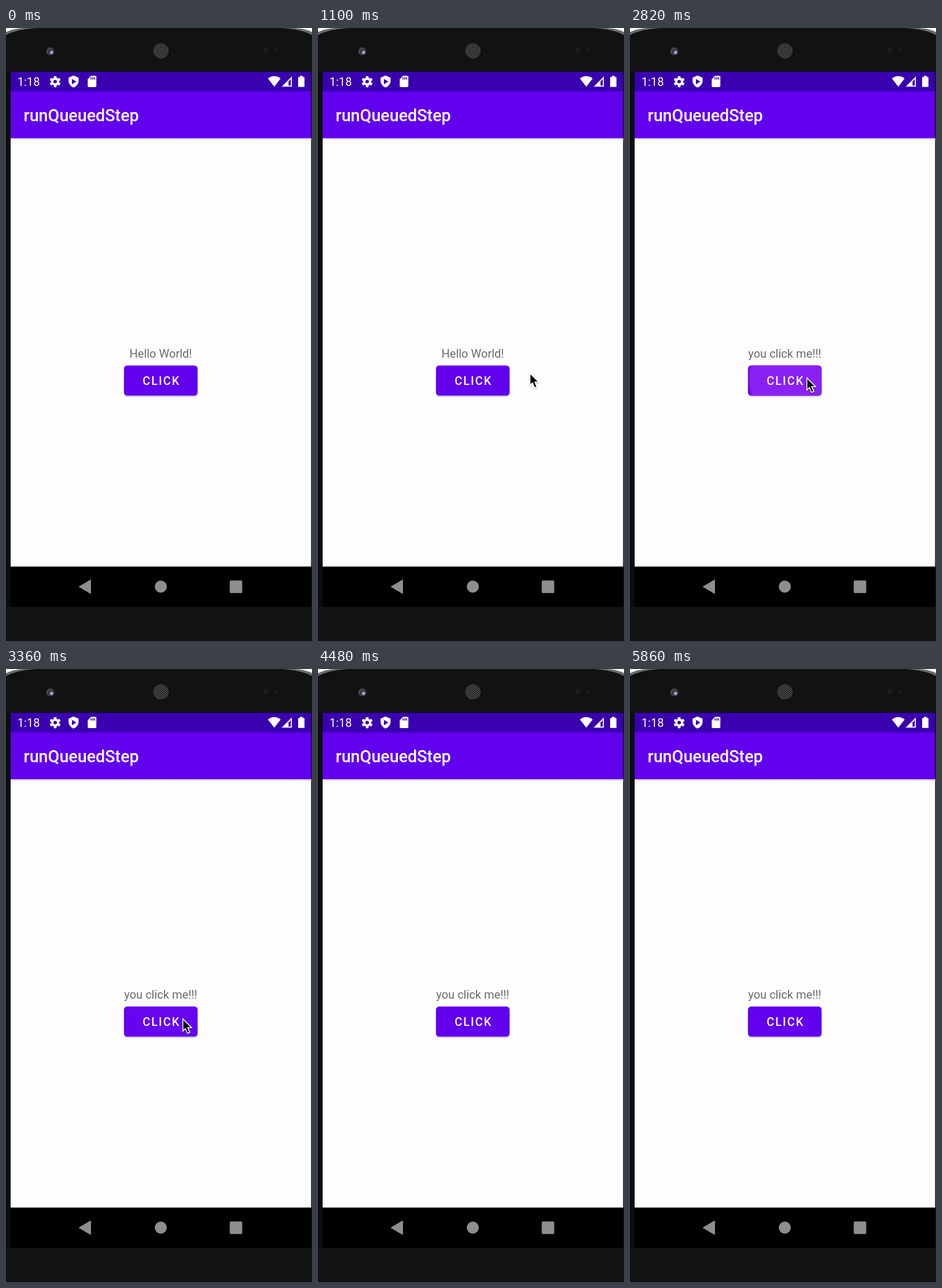
Recreate the animation shown at these times as an HTML page. Size 529 by 1058 pixels, loop 5960 ms.

```html
<!DOCTYPE html>
<html lang="en">
<head>
<meta charset="utf-8">
<title>Button demo</title>
<style>
  html, body { margin: 0; width: 100%; height: 100%; overflow: hidden; background: #fff; }
  svg { display: block; width: 529px; height: 1058px; }
  text { font-family: Roboto, "Noto Sans", sans-serif; }
  .label { font-size: 20.05px; fill: #6b6b6b; text-anchor: middle; }
  .medium { font-weight: 500; fill: #fff; }
  #ripple { transform-box: fill-box; transform-origin: center; }
</style>
</head>
<body>
<svg viewBox="0 0 529 1058" xmlns="http://www.w3.org/2000/svg">
  <defs>
    <pattern id="mesh" width="4" height="4" patternUnits="userSpaceOnUse">
      <rect width="4" height="4" fill="#222"/>
      <circle cx="1" cy="1" r="1" fill="#5a5a5a"/>
      <circle cx="3" cy="3" r="1" fill="#5a5a5a"/>
    </pattern>
    <radialGradient id="lens" cx=".64" cy=".62">
      <stop offset="0" stop-color="#e4e4f6"/>
      <stop offset=".3" stop-color="#8883ac"/>
      <stop offset=".65" stop-color="#2c2b38"/>
      <stop offset="1" stop-color="#484848"/>
    </radialGradient>
    <radialGradient id="glow">
      <stop offset=".94" stop-color="#8a20f2"/>
      <stop offset="1" stop-color="#8a20f2" stop-opacity="0"/>
    </radialGradient>
    <linearGradient id="edge" x2="0" y2="1">
      <stop offset="0" stop-color="#d2d0d8"/>
      <stop offset="1" stop-color="#fdfdfd"/>
    </linearGradient>
    <filter id="soft" x="-10%" y="-20%" width="120%" height="150%">
      <feDropShadow dx="0" dy="1.8" stdDeviation="1.3" flood-opacity=".22"/>
    </filter>
    <filter id="drop" x="-30%" y="-20%" width="170%" height="150%">
      <feDropShadow dx="0" dy="1.5" stdDeviation="1.2" flood-opacity=".3"/>
    </filter>
    <clipPath id="face"><rect x="204" y="582.5" width="127.2" height="52" rx="5.5"/></clipPath>
  </defs>

  <!-- phone body -->
  <path d="M0 7Q13 1 30 0H500Q517 1 529 7V1058H0Z" fill="#6a6a6a"/>
  <path d="M0 12Q20 2 52 0H476Q510 2 529 12V1058H0Z" fill="#121212"/>
  <rect y="76" width="8" height="922" fill="#0c0c0c"/>
  <circle cx="76.8" cy="40.4" r="7" fill="url(#lens)"/>
  <circle cx="268" cy="39.5" r="13.2" fill="url(#mesh)"/>
  <g fill="#1b1b1a"><circle cx="449" cy="38.5" r="5"/><circle cx="466" cy="38.5" r="4"/></g>

  <!-- screen -->
  <rect x="8" y="75" width="519.5" height="924" fill="#000"/>
  <rect x="8" y="190" width="519.5" height="739.5" fill="#fdfdfd"/>
  <rect x="8" y="75.5" width="519.5" height="35" fill="#3a00b0"/>
  <rect x="8" y="109.5" width="519.5" height="81" fill="#6200ee"/>
  <rect x="8" y="190.5" width="519.5" height="4" fill="url(#edge)"/>

  <!-- status bar -->
  <text x="19.8" y="100.3" font-size="20.05" fill="#fff">1:18</text>
  <g fill="#fff">
    <g id="gear" transform="translate(85 92.6)"><circle r="5" fill="none" stroke="#fff" stroke-width="4"/></g>
    <path d="M116.8 82L125.5 85.7V91.5Q125 99.6 116.8 102.8Q108.6 99.6 108.2 91.5V85.7Z"/>
    <path d="M114 87.8L121.4 92.5L114 97.2Z" fill="#3a00b0"/>
    <path d="M147 82.6H154.3Q156.2 82.6 156.2 84.5V100Q156.2 102 154.3 102H143.2Q141.3 102 141.3 100V88.4Z"/>
    <path d="M147.2 85V89M150.2 85V89M153.2 85V89" stroke="#3a00b0" stroke-width="1.6"/>
    <path d="M452.8 87.2Q463.8 78.8 474.8 87.2L463.8 101.3Z"/>
    <path d="M494.2 83.6V101.3H476.6Z"/>
    <path d="M488.4 92.2L492.3 88.3V99.4H488.4Z" fill="#3a00b0"/>
    <path d="M508.2 82.6H512.8V84.6H514.6Q516 84.6 516 86V100.4Q516 101.8 514.6 101.8H506.4Q505 101.8 505 100.4V86Q505 84.6 506.4 84.6H508.2Z"/>
  </g>

  <text class="medium" x="30.6" y="161" font-size="28.7">runQueuedStep</text>

  <!-- content -->
  <text id="before" class="label" x="267.5" y="568.5">Hello World!</text>
  <text id="after" class="label" x="267.5" y="568.5" opacity="0">you click me!!!</text>
  <rect x="204" y="582.5" width="127.2" height="52" rx="5.5" fill="#6200ee" filter="url(#soft)"/>
  <g clip-path="url(#face)"><circle id="ripple" cx="290" cy="606" r="87" fill="url(#glow)" opacity="0"/></g>
  <text class="medium" x="236.2" y="616.4" font-size="20.05" letter-spacing="2">CLICK</text>

  <!-- navigation -->
  <g fill="#8e8e8e">
    <path d="M126.2 964.3L146.4 952.4V976.2Z" stroke="#8e8e8e" stroke-linejoin="round"/>
    <circle cx="267.6" cy="964.2" r="10.4"/>
    <rect x="386.8" y="953.6" width="21.6" height="21.6" rx="2"/>
  </g>

  <g id="pointer" opacity="0" filter="url(#drop)">
    <g transform="scale(1.53)">
      <path d="M0 0L11.6 11.6H6.8L9.1 16.7L5.5 18.2L3.2 12.9L0 16Z" fill="#fff"/>
      <path d="M1 2.4L9.2 10.6H5.2L7.7 16.1L5.9 16.9L3.6 11.2L1 13.6Z"/>
    </g>
  </g>
</svg>
<script>
const LOOP = 5960;
const $ = id => document.getElementById(id);

const gear = $("gear");
for (let i = 0; i < 6; i++) {
  const tooth = document.createElementNS("http://www.w3.org/2000/svg", "rect");
  const attrs = { x: -2.3, y: -9.6, width: 4.6, height: 5, rx: .8, transform: `rotate(${i * 60})` };
  for (const k in attrs) tooth.setAttribute(k, attrs[k]);
  gear.append(tooth);
}

// Rows: [time in ms, value, easing to the next row]
function play(id, prop, rows) {
  const frames = rows.map(([t, value, easing = "linear"]) =>
    ({ offset: t / LOOP, [prop]: value, easing }));
  return $(id).animate(frames, { duration: LOOP, iterations: Infinity });
}

const hold = "step-end";
const at = (x, y) => `translate(${x}px, ${y}px)`;

const tracks = [
  play("before", "opacity", [[0, 1, hold], [2700, 0, hold], [LOOP, 0]]),
  play("after", "opacity", [[0, 0, hold], [2700, 1, hold], [LOOP, 1]]),
  play("pointer", "opacity", [[0, 0, hold], [760, 1, hold], [3760, 0, hold], [LOOP, 0]]),
  play("pointer", "transform", [
    [0, at(532, 590), hold],
    [760, at(532, 590), "ease-out"],
    [1100, at(366, 594), "ease-out"],
    [1400, at(305, 602), hold],
    [3360, at(305, 602), "ease-in"],
    [3760, at(532, 612), hold],
    [LOOP, at(532, 612)]
  ]),
  play("ripple", "transform", [
    [0, "scale(.2)", hold],
    [2600, "scale(.2)", "ease-out"],
    [2820, "scale(1)"],
    [2860, "scale(1.15)", hold],
    [LOOP, "scale(1.15)"]
  ]),
  play("ripple", "opacity", [
    [0, 0, hold],
    [2600, 0],
    [2680, 1, hold],
    [2840, 1],
    [3240, .14],
    [3900, .12],
    [4100, 0, hold],
    [LOOP, 0]
  ])
];

const start = performance.now();
tracks.forEach(t => { t.startTime = start; });
</script>
</body>
</html>
```
